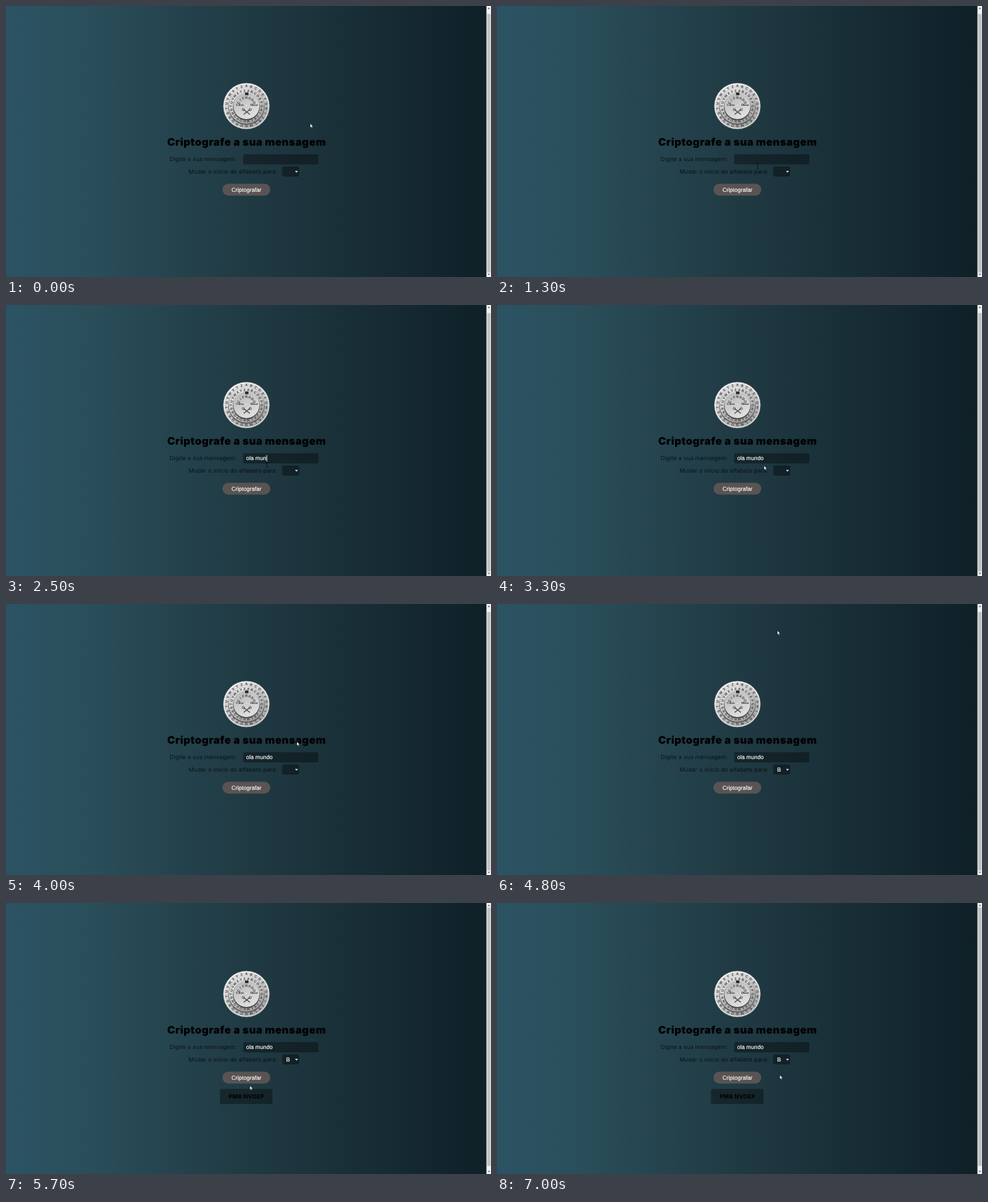
These frames come from a looping animation (692 by 388 pixels, 7.8 s). An HTML page:

```html
<!DOCTYPE html>
<html lang="pt-BR">
<head>
<meta charset="utf-8">
<title>Criptografe a sua mensagem</title>
<style>
  html, body { margin: 0; width: 100%; height: 100%; overflow: hidden; background: #203a43; }
  svg { display: block; width: 692px; height: 388px; }
  text { white-space: pre; text-rendering: geometricPrecision; }
  .label { font: 400 8.2px Inter, sans-serif; letter-spacing: .13px; fill-opacity: .72; }
  .title { font: 900 15px Inter, sans-serif; letter-spacing: .4px; text-anchor: middle; }
  .result { font: 700 8.3px Inter, sans-serif; letter-spacing: .15px; text-anchor: middle; }
  .field { font: 8.1px "Liberation Sans", Arial, sans-serif; fill: #fff; stroke: #fff; stroke-width: .15; }
  .box { fill: #000; fill-opacity: .36; stroke: #000; stroke-opacity: .25; stroke-width: .6; }
  #letters text { font: 700 5px "Liberation Sans", Arial, sans-serif; text-anchor: middle; fill: #3c3c3c; }
  #coin .word { font: 700 4.6px "Liberation Serif", serif; text-anchor: middle; fill: #222; }
</style>
</head>
<body>
<svg viewBox="0 0 692 388">
  <defs>
    <linearGradient id="bg">
      <stop offset="0" stop-color="#2c5364"/>
      <stop offset=".16" stop-color="#2a4f5b"/>
      <stop offset=".5" stop-color="#203a43"/>
      <stop offset="1" stop-color="#0f2027"/>
    </linearGradient>
    <linearGradient id="silver" x1=".2" y1="0" x2=".8" y2="1">
      <stop offset="0" stop-color="#e4e4e4"/>
      <stop offset=".55" stop-color="#c4c4c4"/>
      <stop offset="1" stop-color="#999"/>
    </linearGradient>
    <linearGradient id="disc" x1=".2" y1="0" x2=".7" y2="1">
      <stop offset="0" stop-color="#b8b8b8"/>
      <stop offset="1" stop-color="#e2e2e2"/>
    </linearGradient>
  </defs>

  <rect width="686" height="388" fill="url(#bg)"/>

  <g id="page">
    <g id="coin" transform="translate(343 143.3)">
      <circle r="33" fill="url(#silver)" stroke="#666" stroke-width=".5"/>
      <circle r="31.9" fill="none" stroke="#fff" stroke-opacity=".75" stroke-width="1.1"/>
      <circle r="26" cy=".8" fill="#555"/>
      <circle r="25.4" cy="-.2" fill="url(#silver)"/>
      <circle r="19.2" cy="1.2" fill="#444"/>
      <circle r="18.6" fill="url(#disc)"/>
      <g id="letters"></g>
      <rect x="-2" y="-19.5" width="5" height="4" rx="1" fill="#2c2c2c"/>
      <text class="word" x="-9.5" y="0">Cifra</text>
      <text class="word" x="11" y="0">Disco</text>
      <path d="M-4 5L5 12M5 5L-4 12" stroke="#444" stroke-width="1.1"/>
      <g fill="none" stroke="#444" stroke-width=".9">
        <circle cx="-4.5" cy="5" r="1.6"/><circle cx="5.5" cy="5" r="1.6"/>
      </g>
      <circle cy="-1" r="2" fill="#ddd" stroke="#aaa" stroke-width=".4"/>
    </g>

    <text class="title" x="343.2" y="199.5">Criptografe a sua mensagem</text>

    <text class="label" x="233.6" y="222.4">Digite a sua mensagem:</text>
    <rect class="box" x="338.7" y="212.6" width="106.6" height="13.8" rx="2"/>
    <text class="field" id="typed" x="342.8" y="222.2"></text>
    <rect id="caret" y="215" width=".9" height="9" fill="#fff"/>

    <text class="label" x="260.4" y="239.8">Mudar o início do alfabeto para:</text>
    <rect class="box" x="394.4" y="230.1" width="23.5" height="13.8" rx="2"/>
    <text class="field" id="choice" x="399.8" y="239.8">B</text>
    <path d="M413 236.2l1.5 1.5 1.5-1.5" fill="none" stroke="#fff" stroke-width="1.1"/>

    <rect x="308.8" y="254.4" width="68.3" height="17" rx="8.5" fill="#595453"/>
    <text class="field" x="343" y="265.8" text-anchor="middle">Criptografar</text>

    <g id="result">
      <rect class="box" x="305.7" y="279.4" width="74.2" height="21.2" rx="2"/>
      <text class="result" x="343" y="293.1">PMB NVOEP</text>
    </g>
  </g>

  <rect x="685.5" width="6.5" height="388" fill="#f1f1f1"/>
  <rect id="thumb" x="686.6" width="4.8" height="370" fill="#c1c1c1"/>
  <path d="M687.4 4.2l1.6-2 1.6 2zM687.4 383.6l1.6 2 1.6-2z" fill="#505050"/>

  <g id="pointer">
    <path id="arrow" d="M0 0V6L1.4 4.8 2.3 6.9 3.3 6.5 2.4 4.4H4.3Z" fill="#fff" stroke="#111" stroke-width=".5"/>
    <path id="beam" d="M-1.3-3.5H1.3M0-3.5V3.5M-1.3 3.5H1.3" fill="none" stroke="#0a0a0a" stroke-width=".7"/>
  </g>
</svg>
<script>
const LOOP = 7800;
const $ = id => document.getElementById(id);
const MESSAGE = "ola mundo";

// [start, x, y, shape]; each position holds until the next
const moves = [
  [0, 434, 168.3, "arrow"], [600, 372, 229, "beam"],
  [3200, 375, 229, "arrow"], [3300, 381, 230, "arrow"], [3400, 388, 231, "arrow"],
  [3500, 394, 232, "arrow"], [3600, 399, 233, "arrow"], [3700, 401, 233, "arrow"],
  [3900, 409, 220, "arrow"], [4000, 415, 197, "arrow"], [4100, 419, 160, "arrow"],
  [4200, 418, 121, "arrow"], [4300, 415, 86, "arrow"], [4400, 409, 56, "arrow"],
  [4500, 404, 35, "arrow"], [4600, 401, 25.3, "arrow"],
  [4800, 400, 38, "arrow"], [4900, 397, 72, "arrow"], [5000, 390, 122, "arrow"],
  [5100, 379, 175, "arrow"], [5200, 368, 215, "arrow"], [5300, 358, 240, "arrow"],
  [5400, 351, 255, "arrow"], [5500, 348, 261.5, "arrow"],
  [5800, 365, 258, "arrow"], [5900, 384, 252, "arrow"],
  [6000, 398, 248, "arrow"], [6100, 403.5, 246.3, "arrow"]
];
const keys = [1500, 1600, 1800, 2100, 2200, 2300, 2500, 2600, 2700];
const caretSpans = [[600, 1300], [1500, 3200]];

// Advance of each typed character in em
const advance = { o: .556, l: .222, a: .556, " ": .278, m: .833, u: .556, n: .556, d: .556 };
const widthOf = s => [...s].reduce((sum, c) => sum + advance[c] * 8.1, 0);

const show = (id, on) => $(id).setAttribute("visibility", on ? "visible" : "hidden");

function ring(chars, radius, from, step) {
  [...chars].forEach((c, i) => {
    const t = document.createElementNS("http://www.w3.org/2000/svg", "text");
    t.textContent = c;
    t.setAttribute("transform", `rotate(${from + i * step}) translate(0 ${-radius})`);
    $("letters").append(t);
  });
}
const alphabet = "ABCDEFGHIJKLMNOPQRSTUVWXYZ";
ring(alphabet, 26.9, 0, 360 / 26);
ring(alphabet, 20.2, 7, 360 / 26);
ring("CIFRADO", 10.5, -66, 22);

function draw(t) {
  const [, x, y, shape] = moves.findLast(m => m[0] <= t);
  $("pointer").setAttribute("transform", `translate(${x} ${y})`);
  show("arrow", shape === "arrow");
  show("beam", shape === "beam");

  const text = MESSAGE.slice(0, keys.filter(k => k <= t).length);
  $("typed").textContent = text;
  $("caret").setAttribute("x", 342.8 + widthOf(text));
  show("caret", caretSpans.some(([a, b]) => t >= a && t < b));

  const done = t >= 5700;
  show("choice", t >= 4800);
  show("result", done);
  $("page").setAttribute("transform", `translate(0 ${done ? -13 : 0})`);
  $("thumb").setAttribute("y", done ? 6.5 : 11.5);
}

function tick() {
  draw(performance.now() % LOOP);
  requestAnimationFrame(tick);
}
tick();
</script>
</body>
</html>
```
